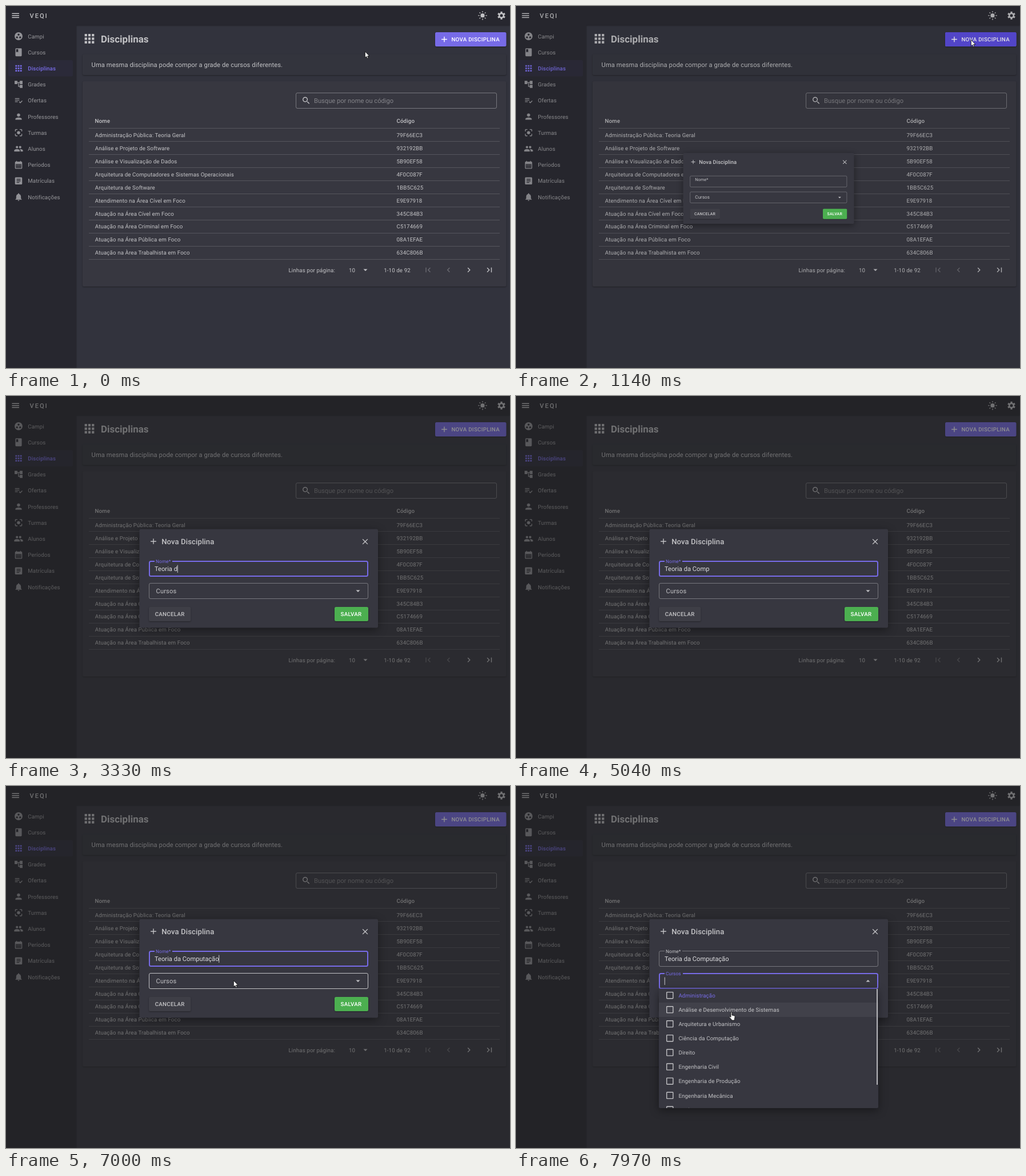
An HTML page for the animation above (8000 ms loop, 882 px wide and 635 px high).

```html
<!DOCTYPE html>
<html lang="pt">
<meta charset="utf-8">
<title>Disciplinas</title>
<style>
  html, body { margin: 0; width: 100%; height: 100%; overflow: hidden; background: #32333d; }
  svg { display: block; width: 882px; height: 635px; }
  text { font: 9.75px Roboto, sans-serif; letter-spacing: .0107em; fill: rgb(255 255 255 / .7);
         white-space: pre; text-rendering: geometricPrecision; }
  .body { font-size: 11.15px; letter-spacing: .0094em; }
  .input { font-size: 11.15px; letter-spacing: 0; }
  .medium { font-weight: 500; }
  .button { font-weight: 500; letter-spacing: .0286em; }
  .nav { fill: rgb(255 255 255 / .52); }
  .active { fill: #776be7; font-weight: 500; }
  .brand { font-size: 11.15px; font-weight: 500; letter-spacing: 1.9px; }
  .h5 { font-size: 17px; font-weight: 700; letter-spacing: 0; }
  .h6 { font-size: 13.1px; font-weight: 500; letter-spacing: .0075em; }
  .flat { filter: drop-shadow(0 1px 1px rgb(0 0 0 / .35)); }
  .raised { filter: drop-shadow(0 4px 8px rgb(0 0 0 / .4)); }
  .field { fill: none; stroke: rgb(255 255 255 / .32); }
</style>
<svg id="stage" viewBox="0 0 882 635"></svg>
<script>
const PRIMARY = '#776be7', SURFACE = '#373740', LIGHT = '#c2c2c5', MUTED = '#929297';

const dot = (x, y, r) => `M${x - r} ${y}a${r} ${r} 0 1 0 ${2 * r} 0a${r} ${r} 0 1 0 ${-2 * r} 0z`;
const box = (x, y, w, h) => `M${x} ${y}h${w}v${h}h${-w}z`;
const grid = (xs, ys, s) => ys.map(y => xs.map(x => box(x, y, s, s)).join('')).join('');
const card = 'M5 3h14a2 2 0 0 1 2 2v14a2 2 0 0 1-2 2H5a2 2 0 0 1-2-2V5a2 2 0 0 1 2-2z';

// Icon outlines on a 24 unit square
const ICONS = {
  menu: box(3, 6, 18, 2) + box(3, 11, 18, 2) + box(3, 16, 18, 2),
  group: dot(12, 12, 10) + dot(12, 8, 2.5) + dot(8, 15, 2.5) + dot(16, 15, 2.5),
  book: 'M18 2H6a2 2 0 0 0-2 2v16a2 2 0 0 0 2 2h12a2 2 0 0 0 2-2V4a2 2 0 0 0-2-2zM6 4h5v8l-2.5-1.5L6 12z',
  apps: grid([4, 10, 16], [4, 10, 16], 4),
  tree: 'M22 11V3h-7v3H9V3H2v8h7V8h2v10h4v3h7v-8h-7v3h-2V8h2v3z',
  checklist: box(3, 6, 11, 2) + box(3, 10, 11, 2) + box(3, 14, 7, 2) +
    'M20.6 11.9l-4.3 4.3-2.1-2.1-1.4 1.4 3.5 3.5L22 13.3z',
  person: dot(12, 8, 4) + 'M12 14c-2.7 0-8 1.3-8 4v2h16v-2c0-2.7-5.3-4-8-4z',
  focus: dot(12, 12, 4) + 'M5 15H3v4a2 2 0 0 0 2 2h4v-2H5zM5 5h4V3H5a2 2 0 0 0-2 2v4h2z' +
    'M19 3h-4v2h4v4h2V5a2 2 0 0 0-2-2zM19 19h-4v2h4a2 2 0 0 0 2-2v-4h-2z',
  people: dot(16, 8, 3) + dot(8, 8, 3) + 'M8 13c-2.3 0-7 1.2-7 3.5V19h14v-2.5c0-2.3-4.7-3.5-7-3.5z' +
    'M16 13l-1 .1c1.2.8 2 1.9 2 3.4V19h6v-2.5c0-2.3-4.7-3.5-7-3.5z',
  calendar: 'M19 4h-1V2h-2v2H8V2H6v2H5a2 2 0 0 0-2 2v14a2 2 0 0 0 2 2h14a2 2 0 0 0 2-2V6a2 2 0 0 0-2-2z' +
    'M19 20H5V10h14z' + grid([7, 11, 15], [12, 16], 2),
  article: card + box(7, 7, 10, 2) + box(7, 11, 10, 2) + box(7, 15, 7, 2),
  bell: 'M12 22a2 2 0 0 0 2-2h-4a2 2 0 0 0 2 2z' +
    'M18 16v-5c0-3-1.6-5.6-4.5-6.3V4a1.5 1.5 0 0 0-3 0v.7C7.6 5.4 6 8 6 11v5l-2 2v1h16v-1z',
  search: dot(9.5, 9.5, 6.5) + dot(9.5, 9.5, 4.5) + 'M14 15.5l1.5-1.5 5 5-1.5 1.5z',
  add: 'M19 13h-6v6h-2v-6H5v-2h6V5h2v6h6z',
  close: 'M19 6.4L17.6 5 12 10.6 6.4 5 5 6.4 10.6 12 5 17.6 6.4 19 12 13.4 17.6 19 19 17.6 13.4 12z',
  down: 'M7 10l5 5 5-5z',
  up: 'M7 14l5-5 5 5z',
  first: 'M18.4 16.6L13.8 12l4.6-4.6L17 6l-6 6 6 6z' + box(6, 6, 2, 12),
  prev: 'M15.4 7.4L14 6l-6 6 6 6 1.4-1.4L10.8 12z',
  next: 'M10 6L8.6 7.4 13.2 12l-4.6 4.6L10 18l6-6z',
  last: 'M5.6 7.4L10.2 12l-4.6 4.6L7 18l6-6-6-6z' + box(16, 6, 2, 12),
  checkbox: card + box(5, 5, 14, 14),
};

const icon = (name, x, y, fill = LIGHT, size = 16.7, id = '') =>
  `<path ${id && `id="${id}"`} d="${ICONS[name]}" fill="${fill}" fill-rule="evenodd"
    transform="translate(${x} ${y}) scale(${size / 24}) translate(-12 -12)"/>`;
const text = (x, y, content, cls = '', extra = '') =>
  `<text x="${x}" y="${y}" class="${cls}" ${extra}>${content}</text>`;
const rect = (x, y, w, h, extra) => `<rect x="${x}" y="${y}" width="${w}" height="${h}" ${extra}/>`;
const spokes = (count, d) => Array.from({ length: count }, (_, i) =>
  `<path d="${d}" transform="rotate(${i * 360 / count})"/>`).join('');

const nav = [['group', 'Campi'], ['book', 'Cursos'], ['apps', 'Disciplinas'], ['tree', 'Grades'],
  ['checklist', 'Ofertas'], ['person', 'Professores'], ['focus', 'Turmas'], ['people', 'Alunos'],
  ['calendar', 'Períodos'], ['article', 'Matrículas'], ['bell', 'Notificações']]
  .map(([name, label], i) => {
    const y = 53 + 28.2 * i, active = i === 2;
    return icon(name, 22, y, active ? PRIMARY : MUTED) + text(38.2, y + 3.5, label, active ? 'active' : 'nav');
  }).join('');

const rows = [['Administração Pública: Teoria Geral', '79F66EC3'], ['Análise e Projeto de Software', '932192BB'],
  ['Análise e Visualização de Dados', '5B90EF58'], ['Arquitetura de Computadores e Sistemas Operacionais', '4F0C087F'],
  ['Arquitetura de Software', '1BB5C625'], ['Atendimento na Área Cível em Foco', 'E9E97918'],
  ['Atuação na Área Cível em Foco', '345C84B3'], ['Atuação na Área Criminal em Foco', 'C5174669'],
  ['Atuação na Área Pública em Foco', '08A1EFAE'], ['Atuação na Àrea Trabalhista em Foco', '634C806B']]
  .map(([name, code], i) => {
    const y = 226.2 + 22.97 * i;
    return text(155.8, y + 3.5, name) + text(683.5, y + 3.5, code) +
      rect(145, Math.round(y + 11), 719, 1, 'fill="#fff" opacity=".15"');
  }).join('');

const options = ['Administração', 'Análise e Desenvolvimento de Sistemas', 'Arquitetura e Urbanismo',
  'Ciência da Computação', 'Direito', 'Engenharia Civil', 'Engenharia de Produção', 'Engenharia Mecânica', 'Medicina']
  .map((label, i) => {
    const y = 367.5 + 25.08 * i;
    return icon('checkbox', 269.3, y - .3) + text(284.4, y + 3.5, label, '', i ? '' : `style="fill:${PRIMARY}"`);
  }).join('');

const field = id => rect(0, 0, 0, 0, `id="${id}" class="field" rx="2.5"`);

stage.innerHTML = `
<defs><clipPath id="menuClip">${rect(250, 355.5, 384, 209.5, 'rx="2.5"')}</clipPath></defs>
${rect(0, 0, 882, 635, 'fill="#32333d"')}
<path class="flat" d="M0 0H882V33.5H123V635H0z" fill="#27272f"/>
${icon('menu', 16.7, 16.7)}${text(41.6, 20.7, 'VEQI', 'brand')}
<g transform="translate(834 16.7)" fill="${LIGHT}" stroke="${LIGHT}" stroke-width="1.3">
  <circle r="3.6" stroke="none"/>${spokes(8, 'M0-5.4V-7.7')}</g>
<g transform="translate(867 16.7)" fill="none" stroke="${LIGHT}">
  <circle r="3.75" stroke-width="2.5"/><g stroke-width="3.2">${spokes(6, 'M0-4.3V-6.9')}</g></g>
${rect(4, 95, 113, 28.5, `rx="2.5" fill="${PRIMARY}" opacity=".05"`)}
${nav}
${icon('apps', 146, 57.3, LIGHT, 25)}${text(165.9, 64.3, 'Disciplinas', 'h5')}
<g class="flat">${rect(751, 46, 124.5, 25, `rx="2.5" fill="${PRIMARY}"`)}
  ${rect(751, 46, 124.5, 25, 'id="hover" rx="2.5" fill="#5a4be2"')}</g>
${icon('add', 767, 58.5, '#fff')}${text(779.4, 62, 'NOVA DISCIPLINA', 'button', 'style="fill:#fff"')}
${rect(134, 84.5, 741.5, 36.5, 'class="flat" rx="2.5" fill="#33343d"')}
${text(149.6, 106.6, 'Uma mesma disciplina pode compor a grade de cursos diferentes.', 'body')}
${rect(134, 132, 741.5, 360, `class="flat" rx="2.5" fill="${SURFACE}"`)}
${rect(507.5, 152.5, 351, 27, 'class="field" rx="2.5"')}
${icon('search', 525.3, 165.8)}
${text(539, 169.8, 'Busque por nome ou código', 'input', 'opacity=".55"')}
${text(155.4, 205, 'Nome', 'medium')}${text(683.5, 205, 'Código', 'medium')}
${rect(145, 214, 719, 1, 'fill="#fff" opacity=".15"')}
${rows}
${text(494.5, 466.7, 'Linhas por página:')}${text(600, 466.7, '10')}${text(661.2, 466.7, '1-10 de 92')}
${icon('down', 629, 463)}${icon('first', 738.5, 463, '#6b6b72')}${icon('prev', 774.5, 463, '#6b6b72')}
${icon('next', 810, 463)}${icon('last', 846, 463)}
${rect(0, 0, 882, 635, 'id="scrim" fill="#212121"')}
<g id="dialog"><g class="raised">${rect(233.5, 233.5, 417.5, 173, `rx="2.5" fill="${SURFACE}"`)}</g>
  ${icon('add', 258, 255)}${text(272.2, 260, 'Nova Disciplina', 'h6')}${icon('close', 628.5, 255.5)}
  ${field('nameField')}${rect(260, 288, 31, 4, `id="nameNotch" fill="${SURFACE}"`)}
  ${text(0, 0, 'Nome*', 'body', 'id="nameLabel"')}
  ${text(260, 306.7, '', 'input', 'id="typed" style="fill:#dcdcde"')}
  ${field('courseField')}${rect(260, 327, 32, 4, `id="courseNotch" fill="${SURFACE}"`)}
  ${text(0, 0, 'Cursos', 'body', 'id="courseLabel"')}
  ${icon('down', 616, 342, LIGHT, 16.7, 'arrow')}
  ${rect(0, 0, .9, 13.5, 'id="caret" fill="#dcdcde"')}
  <g class="flat">${rect(250, 370, 73.5, 25, 'rx="2.5" fill="#3e3e46"')}${rect(575, 370, 59, 25, 'rx="2.5" fill="#4caf50"')}</g>
  ${text(260.7, 385.8, 'CANCELAR', 'button')}${text(585.6, 385.8, 'SALVAR', 'button', 'style="fill:#fff"')}
</g>
<g id="menu" class="raised"><g clip-path="url(#menuClip)">
  ${rect(250, 355, 384, 210, `fill="${SURFACE}"`)}
  ${rect(250, 355, 384, 25, 'id="rowHover" fill="#fff" opacity=".05"')}
  ${options}${rect(631, 356, 2, 168, 'fill="#b4b4b8"')}
</g></g>
<g id="pointer" stroke="#000" stroke-width=".8" fill="#fff" stroke-linejoin="round">
  <path id="arrowCursor" d="M.3.3V11.3L2.8 9 4.5 12.7 6.2 11.9 4.6 8.3H8z"/>
  <path id="handCursor" transform="translate(-4.5 0)"
    d="M3.5 1.5a1 1 0 0 1 2 0V6l4.2 1q1.2.4 1 1.9L10 12.5V15H4.5V13.5L.8 9.5q-.4-1.3.9-1.2L3.5 9.5z"/>
</g>`;

const LOOP = 8000, OPEN = 1100.5, FOCUS = 1118, SELECT = 7160;
const PHRASE = 'Teoria da Computação';
const KEYS = [2210, 2470, 2630, 2800, 2920, 3040, 3210, 3330, 3550, 3680,
  4040, 4120, 4330, 4490, 5130, 5230, 5480, 5520, 5810, 5890];
// time, x, y, easing power (0 is smooth in and out)
const PATH = [[40, 628, 79.5, 1], [240, 642, 61, 0], [400, 642, 61, 1], [850, 796, 59, 0], [1150, 796, 59, 1],
  [1380, 592.5, 157.5, 1], [1680, 571, 179, 2], [6400, 571, 179, 1], [6440, 548, 171, 1], [7000, 398, 341, 1.5],
  [7540, 398, 341, 1], [7970, 377, 396, 0]];

const progress = (t, start, length) => Math.min(1, Math.max(0, (t - start) / length));
const smooth = p => p * p * (3 - 2 * p);
const decelerate = p => 1 - (1 - p) ** 3;
const show = (el, on) => el.setAttribute('visibility', on ? 'visible' : 'hidden');

function pointerAt(t) {
  const next = PATH.findIndex(point => point[0] > t);
  if (next === 0) return PATH[0].slice(1, 3);
  if (next < 0) return PATH.at(-1).slice(1, 3);
  const [t0, x0, y0] = PATH[next - 1], [t1, x1, y1, power] = PATH[next];
  const p = (t - t0) / (t1 - t0), f = power ? 1 - (1 - p) ** power : smooth(p);
  return [x0 + (x1 - x0) * f, y0 + (y1 - y0) * f];
}

// The border grows inwards, so its outer edge stays put
function styleField(border, label, notch, top, lift, focused, hovered) {
  const width = focused ? 2 : 1;
  border.setAttribute('x', 250 + width / 2);
  border.setAttribute('y', top + width / 2);
  border.setAttribute('width', 384 - width);
  border.setAttribute('height', 28 - width);
  border.style.strokeWidth = width;
  border.style.stroke = focused ? PRIMARY : hovered ? LIGHT : '';
  label.style.fill = focused ? PRIMARY : '';
  label.setAttribute('transform',
    `translate(${262.6 - .6 * lift} ${top + 17.7 - 13.8 * lift}) scale(${1 - .25 * lift})`);
  show(notch, lift > .5);
}

function draw(t) {
  const [x, y] = pointerAt(t);
  const visible = t < KEYS[0] || t >= 6440;
  const inMenu = t > SELECT && y > 355;
  pointer.setAttribute('transform', `translate(${x} ${y})`);
  show(arrowCursor, visible && !inMenu);
  show(handCursor, inMenu);

  hover.setAttribute('opacity', smooth(progress(t, 690, 200)) * (1 - smooth(progress(t, 1140, 240))));
  scrim.setAttribute('opacity', .5 * progress(t, OPEN, 150));

  const opening = progress(t, OPEN, 100);
  const scale = .3 + .7 * Math.sin(opening * Math.PI / 2);
  dialog.setAttribute('opacity', Math.min(1, opening * 2.6));
  dialog.setAttribute('transform', `translate(441.3 320) scale(${scale}) translate(-441.3 -320)`);

  const selecting = t >= SELECT;
  styleField(nameField, nameLabel, nameNotch, 289, decelerate(progress(t, FOCUS, 200)),
    t > FOCUS + 40 && !selecting, false);
  styleField(courseField, courseLabel, courseNotch, 328, decelerate(progress(t, SELECT, 160)),
    selecting, t > 1700 && y > 328);
  arrow.setAttribute('d', selecting ? ICONS.up : ICONS.down);

  const count = KEYS.filter(time => time <= t).length;
  typed.textContent = PHRASE.slice(0, count);
  const lastInput = count ? KEYS[count - 1] : FOCUS + 40;
  const blinkOn = Math.floor((t - lastInput) / 530) % 2 === 0;
  caret.setAttribute('x', 259.8 + (selecting || !count ? 0 : typed.getComputedTextLength()));
  caret.setAttribute('y', selecting ? 335.5 : 296.5);
  show(caret, selecting || (t >= lastInput && blinkOn));

  const menuShown = progress(t, 7220, 250);
  menu.setAttribute('opacity', 1 - (1 - menuShown) ** 1.8);
  show(rowHover, inMenu);
  rowHover.setAttribute('y', y < 380 ? 355 : 380);
}

const begin = performance.now();
function tick() {
  draw((performance.now() - begin) % LOOP);
  requestAnimationFrame(tick);
}
tick();
</script>
</html>
```
